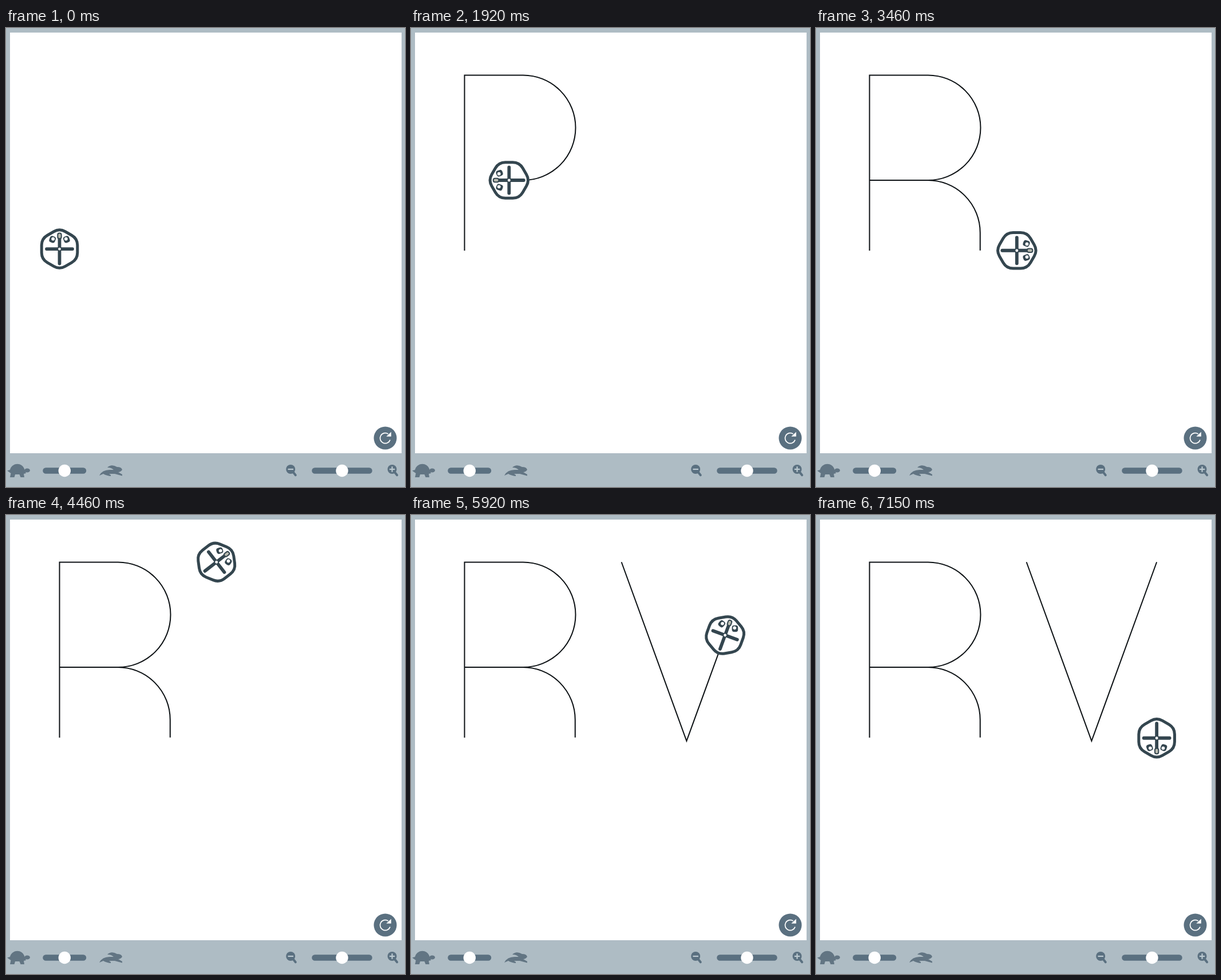
An HTML page that plays this animation: 697x802 px, repeating every 7780 ms.

```html
<!DOCTYPE html>
<html lang="en">
<head>
<meta charset="utf-8">
<title>Drawing robot</title>
<style>
  html, body { margin: 0; width: 100%; height: 100%; overflow: hidden; background: #aebcc4; }
  svg { display: block; width: 697px; height: 802px; }
</style>
</head>
<body>
<svg viewBox="0 0 697 802">
  <rect width="697" height="802" fill="#aebcc4"/>
  <rect x="7" y="8" width="684" height="735" fill="#fff"/>
  <path id="trail" fill="none" stroke="#0c1114" stroke-width="2"/>

  <g id="robot" stroke="#34464f" stroke-linecap="round">
    <path id="shell" fill="#fff" stroke-width="5"/>
    <path d="M-22.5 0H22.5M0 -20V25.5" stroke-width="5.8"/>
    <rect x="-3.2" y="-27.5" width="6.4" height="9.5" rx="2.8" fill="#b9bbb0" stroke-width="2"/>
    <g id="eye" stroke="none">
      <rect x="-17.6" y="-22.4" width="10.6" height="11.4" rx="4" fill="#34464f" transform="rotate(20 -12.3 -16.7)"/>
      <circle cx="-11.3" cy="-17.6" r="2.9" fill="#fff"/>
    </g>
    <use href="#eye" transform="scale(-1 1)"/>
    <circle r="3.3" fill="#fff" stroke-width="1.8"/>
  </g>

  <g fill="none" stroke="#fff" stroke-width="1.7">
    <circle cx="662.5" cy="716.5" r="20" fill="#5a7080" stroke="none"/>
    <path d="M671 719.6A9 9 0 1 1 667.5 709.2"/>
    <path d="M664.3 713.8L672.8 705.8V713.8Z" fill="#fff" stroke="none"/>
  </g>

  <g stroke="#5a7080" stroke-width="10.5" stroke-linecap="round">
    <path d="M69.5 773.5H135M539.5 773.5H634.5"/>
    <g fill="#fff" stroke="none">
      <circle cx="102.3" cy="773.5" r="10.7"/>
      <circle cx="587" cy="773.5" r="10.7"/>
    </g>
  </g>

  <g fill="#627583">
    <path d="M2 773.5L7 772C10 759 29 758 32.5 772L35 778L31 779L32 785H25.5L23.5 780H16L14.5 785H7L8.5 778Z"/>
    <ellipse cx="37" cy="773" rx="5" ry="3.5"/>
    <path d="M163 782Q168 772 181 772H188Q184 768 177 768Q184 761 194 767Q202 767 203 772Q200 776 196 776L203 780V782.5L190 779H180L183 781V783Q175 782 170 779Z"/>
  </g>

  <g id="lens">
    <path d="M502 776.5L505.8 781.2" stroke="#5a7080" stroke-width="4" stroke-linecap="round"/>
    <circle cx="497.2" cy="771" r="8" fill="#5a7080"/>
    <path d="M492.5 771H502" stroke="#bccad1" stroke-width="2.2"/>
  </g>
  <use href="#lens" x="177.3"/>
  <path d="M674.5 766.2V775.8" stroke="#bccad1" stroke-width="2.2"/>
</svg>

<script>
const LOOP = 7780, FPS = 13, LAST = 93;
const SPEED = 0.415, SPIN = 1.33;         // px and degrees per ms
const STEM = 306.5, BAR = 102.25, SLANT = 332.6;
const R = 91.75;
const START = { x: 93.5, y: 389, h: 0 }, LEAD = 7;

const trail = document.getElementById('trail');
const robot = document.getElementById('robot');
const rad = deg => deg * Math.PI / 180;

const go = dist => ({ dist, turn: 0, ms: dist / SPEED });
const turn = deg => ({ dist: 0, turn: deg, ms: Math.abs(deg) / SPIN });
const arc = deg => ({ dist: R * rad(deg), turn: deg, ms: R * rad(deg) / SPEED });
const wait = ms => ({ dist: 0, turn: 0, ms });
const hop = dist => ({ ...go(dist), up: true });

const program = [
  // R
  go(STEM), turn(90), wait(54), go(BAR), arc(180), wait(70),
  go(BAR), turn(180), wait(102), go(BAR - 0.75), arc(90), wait(70), go(31),
  // move to the next letter
  turn(-90), wait(155), hop(80.9), turn(-90), wait(54), hop(STEM), wait(60),
  // V
  turn(160), go(SLANT), turn(-140), go(SLANT), wait(39),
  turn(160), hop(STEM + 1)
];

function advance(p, dist, turn) {
  const a = rad(p.h), b = rad(p.h + turn);
  let dx = dist * Math.sin(a), dy = -dist * Math.cos(a);
  if (dist && turn) {
    const r = dist / rad(turn);
    dx = r * (Math.cos(a) - Math.cos(b));
    dy = r * (Math.sin(a) - Math.sin(b));
  }
  return { x: p.x + dx, y: p.y + dy, h: p.h + turn };
}

function hexagon(apothem, cut) {
  const corner = i => {
    const a = rad(i * 60), r = apothem / Math.cos(rad(30));
    return [r * Math.sin(a), -r * Math.cos(a)];
  };
  const mix = (p, q) => p.map((v, i) => v + (q[i] - v) * cut);
  let d = '';
  for (let i = 0; i < 6; i++) {
    const c = corner(i);
    d += `${i ? 'L' : 'M'}${mix(c, corner(i - 1))}Q${c} ${mix(c, corner(i + 1))}`;
  }
  return d + 'Z';
}

function draw(t) {
  let p = START, left = t + LEAD, d = `M${p.x} ${p.y}`;
  for (const { dist, turn, ms, up } of program) {
    if (left <= 0) break;
    const k = Math.min(1, left / ms);
    p = advance(p, dist * k, turn * k);
    if (up) d += `M${p.x} ${p.y}`;
    else if (dist) d += turn ? `A${R} ${R} 0 0 1 ${p.x} ${p.y}` : `L${p.x} ${p.y}`;
    left -= ms;
  }
  trail.setAttribute('d', d);
  robot.setAttribute('transform', `translate(${p.x} ${p.y}) rotate(${p.h})`);
}

document.getElementById('shell').setAttribute('d', hexagon(31.3, 0.32));

const origin = performance.now();
function tick() {
  const t = (performance.now() - origin) % LOOP;
  // The picture steps at 13 per second; 7 ms covers timer rounding.
  const step = Math.min(LAST, Math.floor((t + 7) * FPS / 1000));
  draw(step * 1000 / FPS);
  requestAnimationFrame(tick);
}
tick();
</script>
</body>
</html>
```
